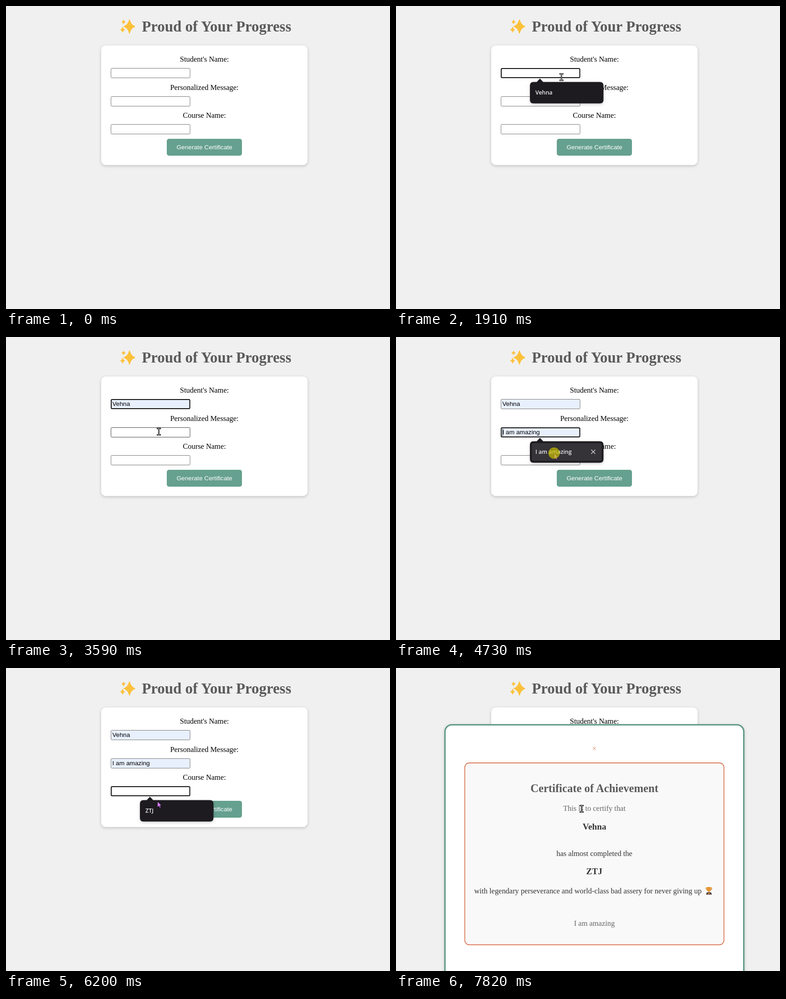
Animation of 843 by 664 pixels, one loop 8000 ms. Source, as an HTML page:

```html
<!DOCTYPE html>
<html lang="en">
<head>
<meta charset="utf-8">
<title>Certificate form</title>
<style>
  html, body { margin: 0; width: 100%; height: 100%; overflow: hidden; background: #f0f0f0; }
  svg { display: block; }
  text { font: 16.45px "Liberation Serif", "Times New Roman", serif; }
  .mid { text-anchor: middle; }
  .sans { font: 13.7px "Liberation Sans", Arial, sans-serif; }
  .tip { font: 600 12.4px "Open Sans", "Noto Sans", sans-serif; fill: #ececec; }
  .h1 { font-size: 32.9px; font-weight: bold; fill: #5a5a5a; }
  .h2 { font-size: 24.67px; font-weight: bold; fill: #5a5a5a; }
  .h3 { font-size: 19.25px; font-weight: bold; fill: #333; }
  .soft { fill: #666; }
  .dark { fill: #333; }
  .card { filter: drop-shadow(0 2px 3px rgba(0, 0, 0, .2)); }
</style>
</head>
<body>
<svg width="843" height="664" viewBox="0 0 843 664">
  <defs>
    <path id="star" d="M0-14.500Q3-3 12-0Q3 3 0 14.500Q-3 3-12 0Q-3-3 0-14.500Z"
      fill="#fcc13c" stroke="#fcc13c" stroke-width="1.800" stroke-linejoin="round"/>
  </defs>
  <use href="#star" x="271" y="45"/>
  <use href="#star" transform="translate(258 35) scale(.36 .32)"/>
  <use href="#star" transform="translate(256 52) scale(.42 .42)"/>
  <text class="h1 mid" x="462.2" y="56">Proud of Your Progress</text>

  <rect class="card" x="209" y="86.5" width="453" height="262" rx="10" fill="#fff"/>
  <g id="fields"></g>
  <rect id="button" x="353" y="291" width="165" height="37" rx="5"/>
  <text class="sans mid" x="435.7" y="314" fill="#fff">Generate Certificate</text>
  <g id="popups"></g>

  <g id="certificate">
    <rect class="card" x="107.5" y="124.5" width="656" height="560" rx="15" fill="#fff" stroke="#5f9a87" stroke-width="3"/>
    <text class="mid" x="435.5" y="182" fill="#d9805f">×</text>
    <rect x="151" y="208" width="569" height="398.5" rx="10" fill="#f9f9f9" stroke="#dc7d5e" stroke-width="1.8"/>
    <text class="h2 mid" x="435.5" y="272">Certificate of Achievement</text>
    <text class="soft mid" x="435.5" y="313">This is to certify that</text>
    <text class="h3 mid" x="435.7" y="353.5" data-value="0"></text>
    <text class="dark mid" x="435.5" y="412">has almost completed the</text>
    <text class="h3 mid" x="435.2" y="452" data-value="2"></text>
    <text class="dark" x="171.7" y="494">with legendary perseverance and world-class bad assery for never giving up</text>
    <text class="soft mid" x="435.5" y="565" data-value="1"></text>
    <g transform="translate(687 480)">
      <path d="M-4 2H-6.5Q-6 7-3 7.5M4 2H6.5Q6 7 3 7.5" fill="none" stroke="#d88a2d" stroke-width="1.4"/>
      <path d="M-4.5 0H4.5V5Q4 9 1.2 9.5V12H-1.2V9.5Q-4 9-4.5 5Z" fill="#e59632"/>
      <path d="M-4.5 11.5H4.5L6.5 16.5H-6.5Z" fill="#4a3d40"/>
      <path d="M-2 13H2V15H-2Z" fill="#e59632"/>
    </g>
  </g>

  <g id="cursor" stroke-linejoin="round">
    <path id="arrow" d="M0 0V13L3.1 10.2L5.2 14.6L7.4 13.6L5.4 9.4H9.2Z" fill="#d67cf4" stroke="#21142a"/>
    <g id="ibeam" fill="none">
      <path d="M-4.5-7H4.5M-4.5 7H4.5M0-7V7" stroke="#1c1c1c" stroke-width="3"/>
      <path d="M-3.5-7H3.5M-3.5 7H3.5M0-7V7" stroke="#bbb" stroke-width="1"/>
    </g>
    <path id="hand" d="M-1.7 1.5a1.7 1.7 0 0 1 3.4 0V7l5 1.2q2.1.6 1.8 2.8l-1.2 7h-7.8l-5-6.2q-.9-2.3 1.2-2.1l2.6 1.9z"
      fill="#d67cf4" stroke="#21142a" stroke-width="1.2"/>
  </g>
  <circle id="click" r="12.5" fill="rgba(200, 190, 0, .7)"/>
</svg>
<script>
const LOOP = 8000, MODAL = 7820, BLINK = 530;
const LEFT = 230, WIDTH = 174.5, HEIGHT = 22;
const $ = id => document.getElementById(id);
const show = (el, on) => el.style.display = on ? "" : "none";

// focus, open, hover, pick: times of each field's suggestion list
const fields = [
  { label: "Student's Name:", value: "Vehna", focus: 1380, open: 1450, hover: 2110, pick: 2980 },
  { label: "Personalized Message:", value: "I am amazing", focus: 3660, open: 3730, hover: 4400, pick: 4940 },
  { label: "Course Name:", value: "ZTJ", focus: 5470, open: 5550, hover: 6270, pick: 6800 }
];
// start, end, steps, x, y
const moves = [
  [130, 250, 3, 389, 252], [520, 580, 2, 387, 262], [647, 1120, 8, 363.5, 142],
  [1910, 2510, 9, 362, 207], [2980, 3390, 7, 335.5, 207.5], [4340, 4460, 3, 347, 254.5],
  [4940, 5270, 6, 332.5, 261.5], [5990, 6270, 5, 332.5, 293.5],
  [6800, 7210, 7, 400, 307], [7277, 7540, 5, 407.5, 308.5]
];
const clicks = [[1380, 1580], [2780, 2980], [3660, 3870], [4730, 4940],
  [5470, 5730], [6530, 6800], [7610, MODAL]];

fields.forEach((f, i) => {
  f.top = Math.round(136 + i * 61.5);
  $("fields").insertAdjacentHTML("beforeend", `<g>
    <text class="mid" x="435.5" y="${f.top - 14}">${f.label}</text>
    <rect rx="2"/>
    <text class="sans" x="233.5" y="${f.top + 15}">${f.value}</text>
    <path stroke="#000"/></g>`);
  $("popups").insertAdjacentHTML("beforeend", `<g transform="translate(294 ${f.top + 30.5})">
    <path class="card" d="M8 0H15L22-7.5L29 0H153.5Q161.5 0 161.5 8V39Q161.5 47 153.5 47H8Q0 47 0 39V8Q0 0 8 0Z" fill="#1d1b20"/>
    <g><rect x="4" y="4" width="153.5" height="39" rx="4" fill="#353238"/>
      <path d="M134.5 18.5l9 9m0-9l-9 9" stroke="#d0d0d0" stroke-width="1.5"/></g>
    <text class="tip" x="12" y="27.5">${f.value}</text></g>`);
  [, f.box, f.text, f.caret] = $("fields").lastElementChild.children;
  f.popup = $("popups").lastElementChild;
  f.row = f.popup.children[1];
});
document.querySelectorAll("[data-value]").forEach(el => el.textContent = fields[el.dataset.value].value);

function pointer(t) {
  let x = 751, y = 689;
  for (const [start, end, steps, toX, toY] of moves) {
    if (t < start) break;
    const step = Math.min(steps, Math.floor((t - start) / (end - start) * (steps - 1)) + 1);
    const p = step / steps, eased = p * (2 - p);
    x += (toX - x) * eased;
    y += (toY - y) * eased;
  }
  return [x, y];
}

function drawBox(box, top, line, stroke, fill) {
  const attrs = {
    x: LEFT + line / 2, y: top + line / 2, width: WIDTH - line, height: HEIGHT - line,
    "stroke-width": line, stroke, fill
  };
  for (const name in attrs) box.setAttribute(name, attrs[name]);
}

function draw(t) {
  const [x, y] = pointer(t);
  const covered = fields.some(f => t >= f.open && t < f.pick && y > f.top + 30);
  let kind = t >= MODAL ? "ibeam" : "arrow";

  fields.forEach((f, i) => {
    const next = fields[i + 1];
    const focused = t >= f.focus && (!next || t < next.focus);
    const over = !covered && x > LEFT && x < LEFT + WIDTH && y > f.top && y < f.top + HEIGHT;
    const filled = t >= f.hover, picked = t >= f.pick;
    if (over) kind = "ibeam";

    drawBox(f.box, f.top, focused ? 2 : 1, focused ? "#101010" : over ? "#444" : "#767676",
      filled ? "#e8f0fe" : "#fff");
    show(f.text, filled);

    const caretX = picked ? 234 + f.text.getComputedTextLength() : 234.5;
    f.caret.setAttribute("d", `M${caretX} ${f.top + 3}v16`);
    show(f.caret, focused && Math.floor((t - (picked ? f.pick : f.focus)) / BLINK) % 2 === 0);
    show(f.popup, t >= f.open && !picked);
    show(f.row, filled);
  });

  const onButton = t > 6800 && t < MODAL && x > 353;
  if (onButton) kind = "hand";
  $("button").setAttribute("fill", onButton ? "#649c8a" : "#66a08f");

  show($("certificate"), t >= MODAL);
  show($("cursor"), t >= 130);
  $("cursor").setAttribute("transform", `translate(${x} ${y})`);
  for (const id of ["arrow", "ibeam", "hand"]) show($(id), id === kind);
  show($("click"), clicks.some(([from, to]) => t >= from && t < to));
  $("click").setAttribute("transform", `translate(${x} ${y})`);
}

function tick() {
  draw(performance.now() % LOOP);
  requestAnimationFrame(tick);
}
tick();
</script>
</body>
</html>
```
